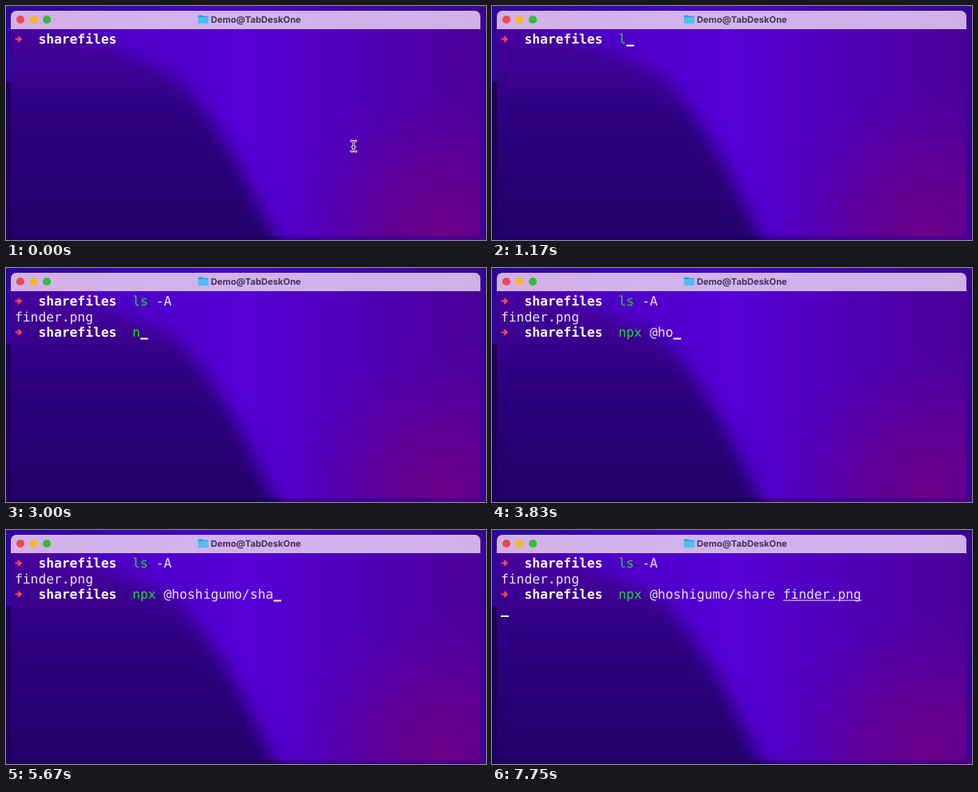
Animation of 600 by 293 pixels, one loop 8 s. Source, as an HTML page:

```html
<!DOCTYPE html>
<html lang="en">
<head>
<meta charset="utf-8">
<title>Terminal</title>
<style>
  html, body { margin: 0; width: 100%; height: 100%; overflow: hidden; background: #2a087e; }
  svg { display: block; width: 100vw; height: 100vh; }
  text { white-space: pre; text-rendering: geometricPrecision; }
  .mono { font: 16.28px "DejaVu Sans Mono", monospace; fill: #e9e2f6; }
  .mono.dir { font-weight: 700; fill: #fff; }
  .mono.cmd { fill: #2bcf32; }
  .title { font: 700 11.2px Inter, sans-serif; fill: #43354f; }
</style>
</head>
<body>
<svg viewBox="0 0 600 293">
  <defs>
    <linearGradient id="desk">
      <stop offset="0" stop-color="#2a079a"/>
      <stop offset=".45" stop-color="#4505c0"/>
      <stop offset="1" stop-color="#3a0596"/>
    </linearGradient>
    <linearGradient id="glow">
      <stop offset=".25" stop-color="#4e00c8"/>
      <stop offset=".5" stop-color="#5500d6"/>
      <stop offset=".7" stop-color="#5000bc"/>
      <stop offset="1" stop-color="#4a0096"/>
    </linearGradient>
    <linearGradient id="hill" x2="0" y2="1">
      <stop offset=".08" stop-color="#47009c"/>
      <stop offset=".4" stop-color="#2e0080"/>
      <stop offset="1" stop-color="#200062"/>
    </linearGradient>
    <linearGradient id="bar">
      <stop offset="0" stop-color="#d3b1e6"/>
      <stop offset=".5" stop-color="#d1b3f0"/>
      <stop offset="1" stop-color="#cfb0e6"/>
    </linearGradient>
    <radialGradient id="pink" gradientUnits="userSpaceOnUse" cx="545" cy="280" r="190">
      <stop offset="0" stop-color="#6c0088"/>
      <stop offset=".4" stop-color="#660090" stop-opacity=".75"/>
      <stop offset="1" stop-color="#5a00a8" stop-opacity="0"/>
    </radialGradient>
    <linearGradient id="floor">
      <stop offset=".54" stop-color="#1c005c"/>
      <stop offset=".59" stop-color="#3d0098"/>
      <stop offset="1" stop-color="#4c0084"/>
    </linearGradient>
    <filter id="soft" x="-20%" y="-20%" width="140%" height="140%">
      <feGaussianBlur stdDeviation="11"/>
    </filter>
    <clipPath id="frame"><rect x="6" y="6" width="587" height="282" rx="7"/></clipPath>
  </defs>

  <rect width="600" height="293" fill="url(#desk)"/>
  <rect y="95" width="7" height="198" fill="#1b005a"/>
  <rect y="286" width="600" height="7" fill="url(#floor)"/>

  <g clip-path="url(#frame)">
    <rect width="600" height="293" fill="url(#glow)"/>
    <rect width="600" height="293" fill="url(#pink)"/>
    <path d="M-40 10L60 22L150 60L212 87L250 132L290 196L350 320H-40Z" fill="url(#hill)" filter="url(#soft)"/>
    <rect x="6" y="6" width="587" height="23" fill="url(#bar)"/>
  </g>

  <circle cx="18" cy="17" r="5.1" fill="#ee4a50"/>
  <circle cx="34.5" cy="17" r="5.1" fill="#f3b62c"/>
  <circle cx="51" cy="17" r="5.1" fill="#32bd3b"/>
  <path d="M240 13q0-1.5 1.500-1.500h3.500l1.500 1.300h5q1.500 0 1.500 1.500v6.200q0 1.500-1.500 1.500h-10q-1.500 0-1.500-1.500z" fill="#2b9cd6"/>
  <rect x="240" y="14" width="13" height="8" rx="1.300" fill="#4fc0f0"/>
  <text class="title" x="256" y="20.500">Demo@TabDeskOne</text>

  <g id="screen"></g>
  <rect id="caret" width="9.8" height="2" fill="#fff"/>
  <g id="mouse" fill="none" stroke-linecap="round">
    <path d="M431.500 169q3 0 3 2.500v8q0 2.500-3 2.500M437.500 169q-3 0-3 2.500v8q0 2.500 3 2.500M432.700 176.500h3.600" stroke="#e8e0f4" stroke-width="2.800"/>
    <path d="M431.500 169q3 0 3 2.500v8q0 2.500-3 2.500M437.500 169q-3 0-3 2.500v8q0 2.500 3 2.500M432.700 176.500h3.600" stroke="#30104c" stroke-width="1"/>
  </g>
</svg>
<script>
const LOOP = 8000, LEFT = 11, PITCH = 9.8, TOP = 47, LEADING = 19.5, CMD = 15;
const LIST_RUN = 1900, SHARE_RUN = 7580, FILE = "finder.png";

// Bursts of typing: start, time per key, text
const listKeys = [[1080, 150, "ls -A"]];
const shareKeys = [
  [2960, 136, "npx @hoshigumo"],
  [5000, 187, "/share "],
  [6260, 120, FILE],
];

const $ = id => document.getElementById(id);
const colX = col => LEFT + col * PITCH;
const rowY = row => TOP + row * LEADING;

const typed = (bursts, t) => bursts.map(([start, step, text]) =>
  t < start ? "" : text.slice(0, Math.floor((t - start) / step) + 1)).join("");

const write = (col, row, text, kind = "") =>
  `<text class="mono ${kind}" x="${colX(col)}" y="${rowY(row)}">${text}</text>`;

function prompt(row, line) {
  const y = rowY(row) - 5.5;
  const space = line.indexOf(" ");
  const split = space < 0 ? line.length : space;
  const arrow = `<path d="M11.500 ${y - 1}h4l-1-2.800h1.700l4 3.800-4 3.800h-1.700l1-2.800h-4z" fill="#f4485c"/>`;
  return arrow + write(3, row, "sharefiles", "dir")
    + write(CMD, row, line.slice(0, split), "cmd")
    + write(CMD + split, row, line.slice(split));
}

function underline(row, col, length) {
  return `<rect x="${colX(col)}" y="${rowY(row) + 1.6}" width="${length * PITCH}" height="1" fill="#e9e2f6"/>`;
}

let shown = "";
function draw(t) {
  const list = typed(listKeys, t), share = typed(shareKeys, t);
  let html = prompt(0, list), row = 0, col = CMD + list.length;
  if (t >= LIST_RUN) {
    html += write(0, 1, FILE) + prompt(2, share);
    row = 2;
    col = CMD + share.length;
    const fileAt = share.lastIndexOf(" ") + 1;
    if (fileAt > 4 && fileAt < share.length)
      html += underline(2, CMD + fileAt, share.length - fileAt);
  }
  if (t >= SHARE_RUN) {
    row = 3;
    col = 0;
  }
  if (html !== shown) $("screen").innerHTML = shown = html;
  $("caret").setAttribute("x", colX(col));
  $("caret").setAttribute("y", rowY(row) + 1.5);
  $("caret").style.display = t < 420 ? "none" : "";
  $("mouse").style.display = t < listKeys[0][0] ? "" : "none";
}

const begin = performance.now();
function tick() {
  draw((performance.now() - begin) % LOOP);
  requestAnimationFrame(tick);
}
tick();
</script>
</body>
</html>
```
